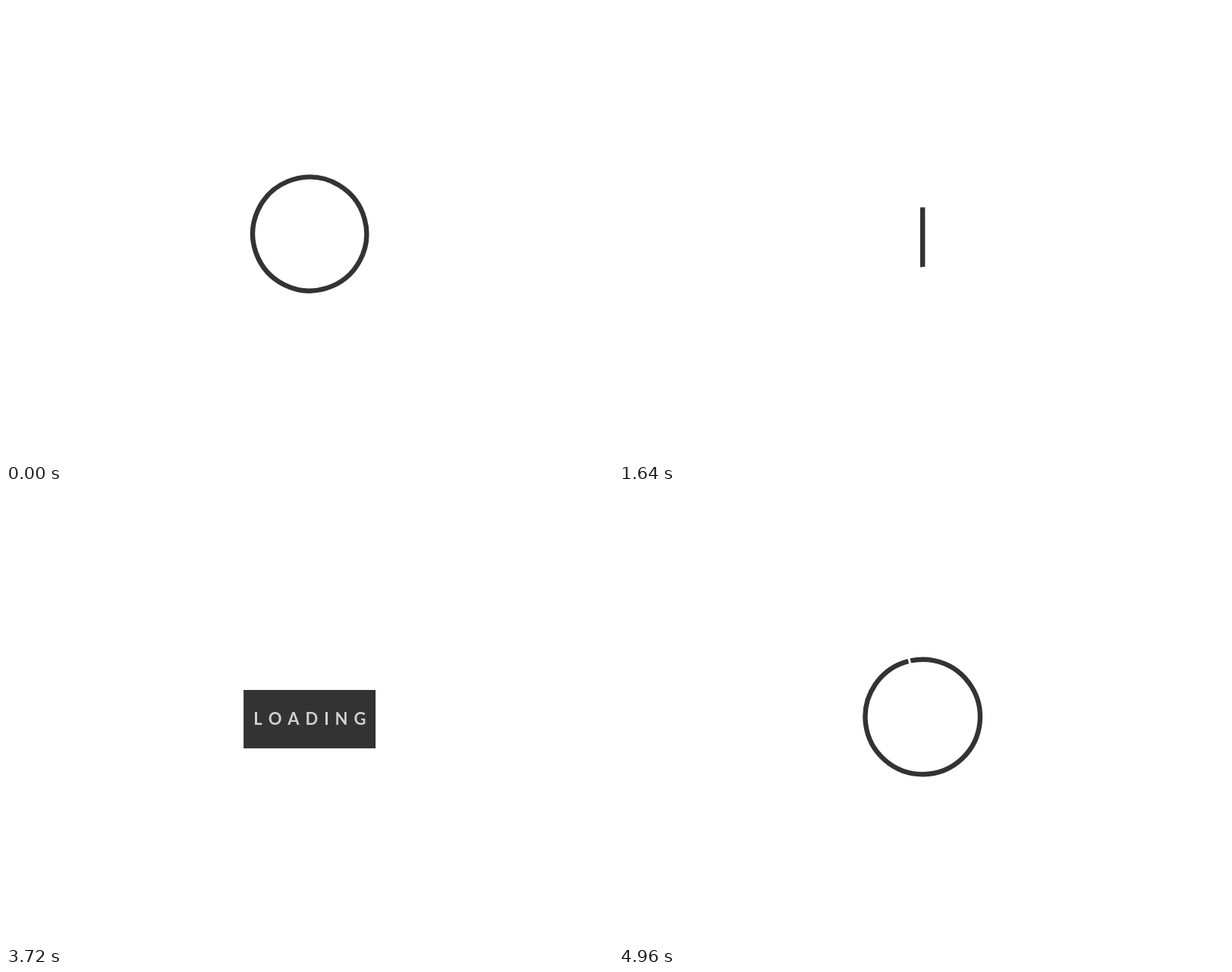
Write an HTML page that moves like this. It is 800 px wide and 600 px high and loops after 5 s.

```html
<!DOCTYPE html>
<html lang="en">
<head>
<meta charset="utf-8">
<title>Loading</title>
<style>
  html, body { margin: 0; width: 100%; height: 100%; overflow: hidden; background: #fff; }
  svg { display: block; width: 800px; height: 600px; }
  path { fill: none; stroke: #333; stroke-width: 6.4; }
  rect { fill: #333; }
  text { fill: #fff; font: 700 22px Lato, sans-serif; }
</style>
</head>
<body>
<svg id="stage" viewBox="0 0 800 600">
  <path id="arrive"/>
  <path id="leave"/>
  <rect id="box" y="265" height="77"/>
  <g id="word"></g>
</svg>
<script>
const LOOP = 5000, CX = 400.2, CY = 300.5;
const TOP = 265, BOTTOM = 342, BAR = BOTTOM - TOP;
const BAR_WIDTH = 6.4, PEAK_WIDTH = 191, BOX_WIDTH = 184.5;
const byId = id => document.getElementById(id);
const clamp = v => Math.min(1, Math.max(0, v));
const mix = (a, b, p) => a + (b - a) * p;
const span = (t, from, to) => clamp((t - from) / (to - from));
const easeInOut = bezier(0.42, 0.58);
const easeOut = p => 1 - (1 - p) ** 2;

// Cubic easing with flat ends; x1 and x2 are the handle positions.
function bezier(x1, x2) {
  return x => {
    let low = 0, high = 1;
    for (let i = 0; i < 30; i++) {
      const s = (low + high) / 2;
      const at = 3 * x1 * s * (1 - s) ** 2 + 3 * x2 * s * s * (1 - s) + s ** 3;
      if (at < x) low = s; else high = s;
    }
    return low * low * (3 - 2 * low);
  };
}

// Angles are in degrees, clockwise from the top.
function onCircle(r, deg) {
  const a = deg * Math.PI / 180;
  return [CX + r * Math.sin(a), CY - r * Math.cos(a)];
}

function arc(r, from, to) {
  let d = "";
  const steps = Math.ceil((to - from) / 90);
  for (let i = 1; i <= steps; i++) {
    d += `A${r} ${r} 0 0 1 ${onCircle(r, mix(from, to, i / steps))}`;
  }
  return d;
}

// Handle along the circle's tangent, positive is clockwise.
function tangent(r, deg, length) {
  const a = deg * Math.PI / 180, [x, y] = onCircle(r, deg);
  return [x + length * Math.cos(a), y + length * Math.sin(a)];
}

const R_IN = 75, R_OUT = 75.7, SEAM = -13;
const JOIN_IN = 145, JOIN_OUT = 35, LAP = 360;

const arrive = byId("arrive"), leave = byId("leave");
arrive.setAttribute("d",
  `M${onCircle(R_IN, SEAM)}` + arc(R_IN, SEAM, JOIN_IN + 2 * LAP) +
  `C${tangent(R_IN, JOIN_IN, 22)} ${CX},${BOTTOM + 20} ${CX},${BOTTOM}V${TOP}`);
leave.setAttribute("d",
  `M${CX},${BOTTOM}V${TOP}C${CX},${TOP - 20} ${tangent(R_OUT, JOIN_OUT, -22)} ${onCircle(R_OUT, JOIN_OUT)}` +
  arc(R_OUT, JOIN_OUT, SEAM + 2 * LAP));

const arriveLength = arrive.getTotalLength(), leaveLength = leave.getTotalLength();
const ringIn = 2 * Math.PI * R_IN, ringOut = 2 * Math.PI * R_OUT;
const arriveTail = bezier(0.26, 0.4), arriveHead = bezier(0.51, 0.35);
const leaveTail = bezier(0.6, 0.7), leaveHead = bezier(0.6, 0.65);

function show(node, visible) {
  node.style.display = visible ? "" : "none";
}

function trim(path, from, to) {
  path.setAttribute("stroke-dasharray", `0 ${from} ${Math.max(0, to - from)} 9999`);
}

const word = byId("word");
let penX = 326.3;
const letters = [..."LOADING"].map(char => {
  const node = document.createElementNS("http://www.w3.org/2000/svg", "text");
  node.textContent = char;
  node.setAttribute("x", penX);
  word.append(node);
  penX += node.getComputedTextLength() + 7.9;
  return node;
});

function drawArrival(t) {
  const p = span(t, 100, 1740);
  const tail = mix(0, arriveLength - BAR, arriveTail(p));
  const head = mix(ringIn, arriveLength, arriveHead(p));
  trim(arrive, p ? tail : 0, p ? head : ringIn + 1);
}

function drawDeparture(t) {
  const overshoot = 5 * ringOut / LAP;
  const rest = leaveLength - ringOut;
  const tail = mix(0, rest + overshoot, leaveTail(span(t, 3920, 4840)))
    - overshoot * easeOut(span(t, 4800, 5000));
  trim(leave, tail, mix(BAR, leaveLength, leaveHead(span(t, 3920, 5000))));
}

function drawBox(t) {
  let width = mix(BAR_WIDTH, PEAK_WIDTH, easeInOut(span(t, 1760, 2200)));
  width = mix(width, BOX_WIDTH, easeInOut(span(t, 2240, 2320)));
  width = mix(width, BAR_WIDTH, easeInOut(span(t, 3680, 3920)));
  const box = byId("box");
  box.setAttribute("x", CX - 0.1 - width / 2);
  box.setAttribute("width", width);
}

function drawWord(t) {
  word.setAttribute("opacity", 1 - span(t, 3680, 3860));
  letters.forEach((node, i) => {
    const start = 2200 + 80 * i;
    const p = easeOut(span(t, start, start + 160));
    node.setAttribute("opacity", p);
    node.setAttribute("y", mix(320.5, 310.5, p));
  });
}

function draw(t) {
  const arriving = t < 1760, leaving = t >= 3920;
  show(arrive, arriving);
  show(leave, leaving);
  show(byId("box"), !arriving && !leaving);
  show(word, !arriving && !leaving);
  if (arriving) drawArrival(t);
  else if (leaving) drawDeparture(t);
  else {
    drawBox(t);
    drawWord(t);
  }
}

const began = performance.now();
function tick() {
  draw((performance.now() - began) % LOOP);
  requestAnimationFrame(tick);
}
draw(0);
requestAnimationFrame(tick);
</script>
</body>
</html>
```
